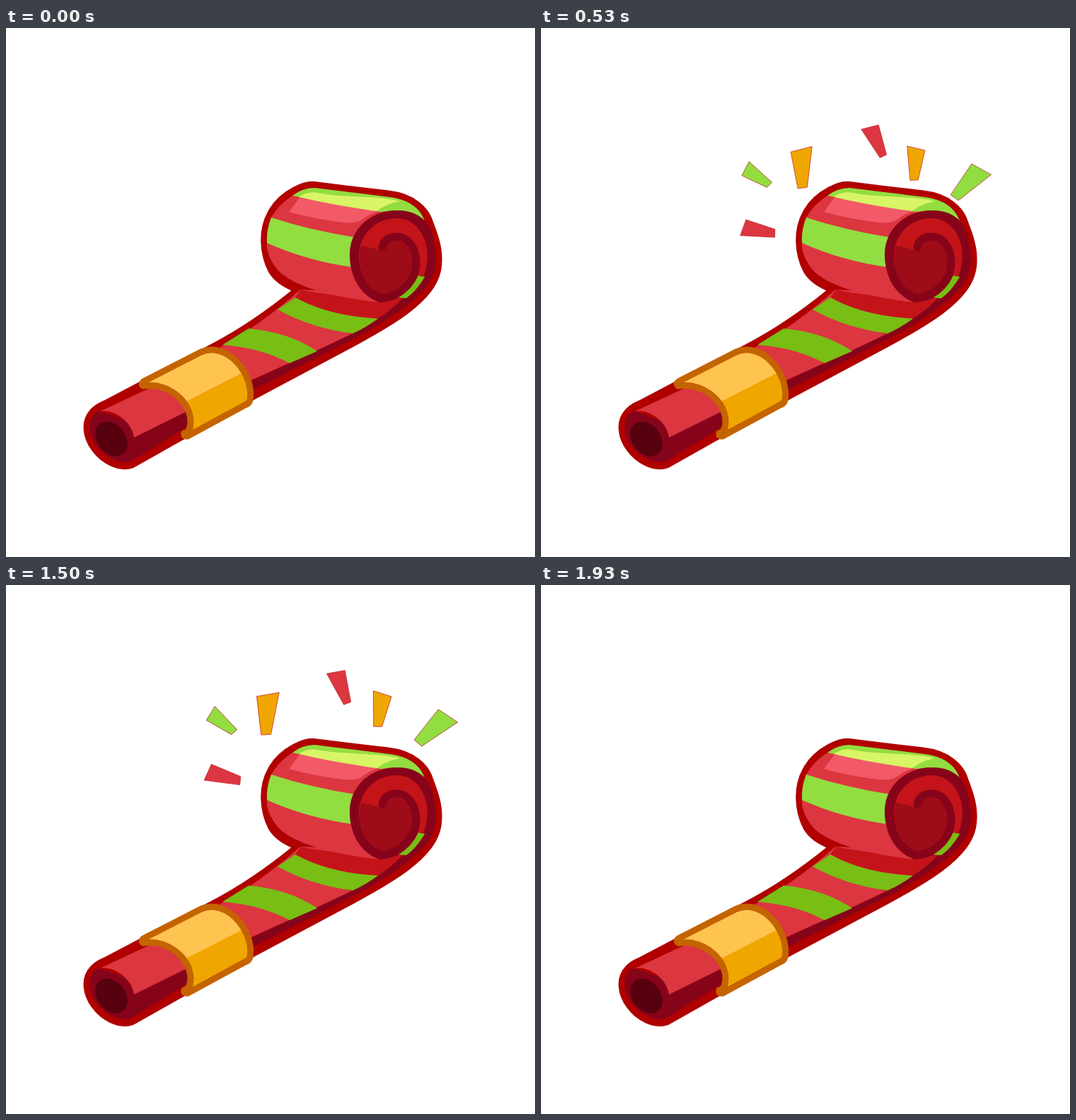
An HTML page that plays this animation: 748x748 px, repeating every 2.04 s.

```html
<!DOCTYPE html>
<html lang="en">
<head>
<meta charset="utf-8">
<title>Party horn</title>
<style>
  html, body { margin: 0; width: 100%; height: 100%; overflow: hidden; background: #fff; }
  svg { display: block; width: 100%; height: 100%; }
  .rim { fill: #b00000; stroke: #b00000; stroke-width: 9; stroke-linejoin: round; }
  .red { fill: #dc3640; }
  .deep { fill: #c4141a; }
  .dark { fill: #86041a; }
  .core { fill: #9e0c18; }
  .hole { fill: #57000e; }
  .lime { fill: #92dd40; }
  .leaf { fill: #78be14; }
  .glow { fill: #d8f566; }
  .pink { fill: #f25a68; }
  .gold { fill: #f0a600; }
  .sun { fill: #ffc350; }
  .line { fill: none; stroke-linecap: round; stroke-linejoin: round; }
  #confetti polygon { stroke: #c0282c; stroke-width: .8; }
</style>
</head>
<body>
<svg viewBox="0 0 748 748">
  <g id="confetti"></g>

  <path class="rim" d="M122,543 Q128,536 140,531 L290,452 Q350,421 412,370 Q385,360 375,343
    C362,318 361,285 374,262 Q384,242 408,229 Q425,220 436,221.5 L480,227 L540,234
    C575,238 594,256 600,276 C606,292 613,310 612,330 C612,360 590,382 565,401
    C535,423 505,438 485,449 L350,521 L178,618 C160,624 137,612 125,595 C112,578 110,556 122,543Z"/>

  <!-- mouthpiece -->
  <path class="dark" d="M119,556 Q122,543 134,542 L182,560 L262,530 V560 L178,612
    Q166,617 152,610 C128,599 115,577 119,556Z"/>
  <path class="red" d="M133,542 L212,505 Q255,515 258,541 L181,579 C178,556 152,538 133,542Z"/>
  <ellipse class="hole" cx="149" cy="581" rx="27" ry="20" transform="rotate(52 149 581)"/>

  <!-- ribbon -->
  <path class="dark" d="M330,507 L485,432 L560,380 L592,350 L596,276 C602,292 608,308 608,328
    C608,356 588,376 561,396 C532,418 502,434 480,445 L345,514Z"/>
  <path class="red" d="M296,455 Q358,422 416,370 L560,375 C540,402 515,420 490,432
    Q440,456 400,474 L340,501Z"/>
  <path class="leaf" d="M306,448 L343,425 Q400,430 440,457 L401,474 Q360,452 306,448Z"/>
  <path class="deep" d="M436,419 L492,431 L488,433Z"/>
  <path class="deep" d="M409,381 L417,370 Q460,380 530,380 L562,381 Q546,398 526,411 Q455,407 409,381Z"/>
  <path class="leaf" d="M409,381 Q455,407 526,411 Q510,423 490,432 Q430,424 384,398Z"/>
  <path class="leaf" d="M583,349 L592,352 Q580,372 566,382 L555,381Z"/>

  <!-- roll -->
  <path class="red" d="M405,237 L540,255 L520,330 L530,388 C470,382 400,366 381,338
    C372,325 368,314 369,304 Q368,286 375,268 Q385,250 405,237Z"/>
  <path class="lime" d="M405,237 Q420,226 436,226 L542,239 C572,243 586,256 592,273
    Q578,258 552,258 L530,260 Q465,250 405,237Z"/>
  <path class="lime" d="M375,268 Q430,286 494,296 L489,338 Q425,329 369,304 Q368,286 375,268Z"/>
  <path class="pink" d="M415,240 L526,259 Q512,264 505,270 Q497,277 478,275 Q440,271 400,260Z"/>
  <path class="glow" d="M414,239 Q428,229 445,234 C480,240 530,237 557,245 Q536,249 525,259 Q465,251 414,239Z"/>

  <!-- spiral end -->
  <path class="dark" d="M528,388 C503,380 485,352 486,318 C487,284 516,258 552,258
    C580,258 598,270 604,297 L603,335 L590,351 Q565,386 528,388Z"/>
  <path class="deep" d="M499,325 C498,294 521,269 552,269 C579,269 596,294 596,323
    Q595,340 590,351 L583,350 L565,376 L535,377 C515,372 500,350 499,325Z"/>
  <path class="core" d="M502,308 Q516,310 531,315 L545,299 Q576,302 577,332
    C577,352 560,372 534,377 C507,369 494,340 502,308Z"/>
  <path class="leaf" d="M583,350 L592,352 Q580,372 566,382 L555,381 Q574,370 583,350Z"/>
  <path class="line" stroke="#86041a" stroke-width="11"
    d="M532,310 C534,299 543,295 552,295 C570,295 580,313 580,332 C580,358 555,382 528,382"/>

  <!-- band -->
  <path class="gold" d="M194,504 L290,454 C322,456 350,490 345,528 L253,577 C272,540 240,498 194,504Z"/>
  <path class="sun" d="M194,504 L290,454 C312,457 326,470 335,487 L251,530 C240,512 222,502 194,504Z"/>
  <path class="line" stroke="#c46400" stroke-width="9"
    d="M194,506 C191,504 192,501 196,499 L276,458 C314,443 351,490 345,526 Q344,531 338,533
    L257,577 Q251,578 252,573 Q258,572 260,566"/>
  <path class="line" stroke="#c46400" stroke-width="9" d="M195,506 C232,500 270,535 259,568 L253,575"/>
</svg>

<script>
const LOOP = 2040, STEP = 100 / 3;
const RED = '#dc3640', LIME = '#92dd40', GOLD = '#f0a600';
const shapes = [
  [RED,  [290, 256, 332, 273, 331, 285, 280, 279]],
  [LIME, [295, 174, 327, 207, 319, 214, 283, 194]],
  [GOLD, [354, 160, 386, 154, 375, 214, 361, 215]],
  [RED,  [453, 128, 479, 123, 488, 168, 478, 172]],
  [GOLD, [519, 152, 545, 160, 532, 203, 520, 203]],
  [LIME, [611, 178, 639, 196, 588, 231, 577, 222]]
];

const group = document.getElementById('confetti');
const pieces = shapes.map(([fill, pts]) => {
  const el = document.createElementNS('http://www.w3.org/2000/svg', 'polygon');
  const mean = axis => pts.reduce((sum, v, i) => sum + (i % 2 === axis ? v : 0), 0) / 4;
  el.setAttribute('points', pts.join(' '));
  el.setAttribute('fill', fill);
  group.append(el);
  return { el, x: mean(0), y: mean(1) };
});

// Vertical offset: cubic ease-out on the way in, cubic ease-in on the way out.
function offset(n) {
  if (n < 25) return 279 * (1 - n / 25) ** 3;
  if (n > 40) return -119 * ((n - 40) / 18) ** 3;
  return 0;
}

function draw(now) {
  const n = Math.floor((now % LOOP + 4) / STEP);
  const dy = offset(n);
  const turn = -0.285 * dy;
  const size = Math.max(0, 1 - 0.0037 * Math.abs(dy));
  group.style.display = n >= 2 && n < 58 ? '' : 'none';
  for (const { el, x, y } of pieces) {
    el.setAttribute('transform',
      `translate(${x} ${y + dy}) rotate(${turn}) scale(${size}) translate(${-x} ${-y})`);
  }
}

const start = performance.now();
function tick() {
  draw(performance.now() - start);
  requestAnimationFrame(tick);
}
tick();
</script>
</body>
</html>
```
